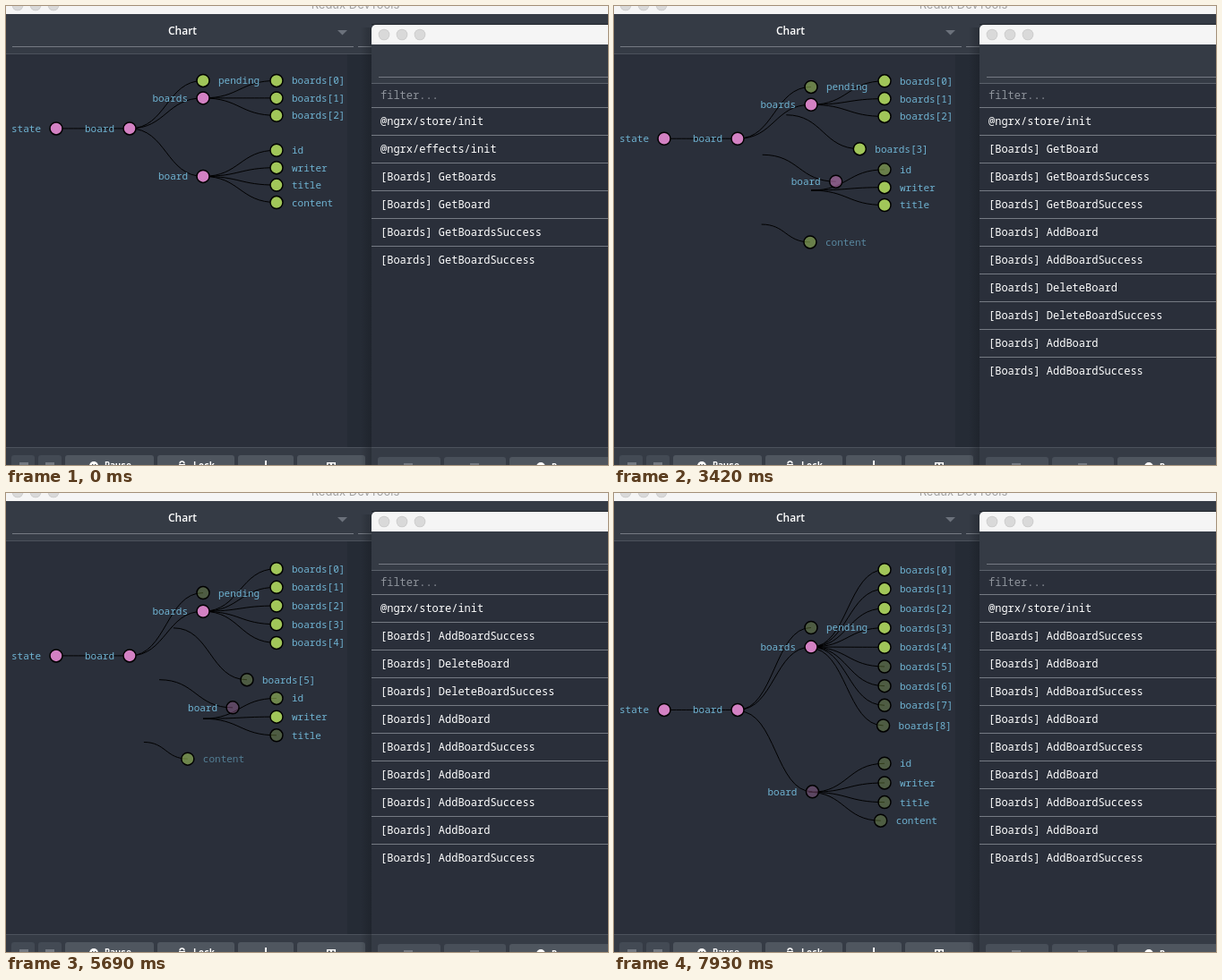
An HTML page with a canvas that plays this animation: 672 by 513 pixels, repeating every 7.99 s.

```html
<!DOCTYPE html>
<html lang="en">
<head>
<meta charset="utf-8">
<title>State chart</title>
<style>
  html, body { margin: 0; width: 100%; height: 100%; overflow: hidden; background: #2a2f3a; }
  canvas { display: block; }
</style>
</head>
<body>
<canvas id="stage" width="672" height="513"></canvas>
<script>
const ctx = document.getElementById('stage').getContext('2d');
const LOOP = 7990, MOVE = 750, BLINK = 100, LEAD = 50, DIM = 0.3;
const BG = '#2a2f3a', HEADER = '#353b45', LINE = '#757a83', BUTTON = '#4f565f';
const MONO = '"Noto Sans Mono", "DejaVu Sans Mono", monospace';
const SANS = '"Open Sans", Roboto, sans-serif';

// Each step changes the number of boards; gap is the delay between request and success.
const steps = [
  [210, 1], [1500, -1], [3050, 1], [4620, 1, 20], [5340, 1], [6005, 1], [6675, 1, 20], [7354, 1]
].map(([at, delta, gap = 0]) => ({ at, delta, gap, start: at - LEAD }));

const log = ['@ngrx/store/init', '@ngrx/effects/init', '[Boards] GetBoards', '[Boards] GetBoard',
  '[Boards] GetBoardsSuccess', '[Boards] GetBoardSuccess'].map(name => ({ at: 0, name }));
for (const { at, delta, gap } of steps) {
  const name = `[Boards] ${delta > 0 ? 'Add' : 'Delete'}Board`;
  log.push({ at: at - gap, name }, { at, name: name + 'Success' });
}

const mix = (a, b, p) => a + (b - a) * p;
const easeCubic = x => x < 0.5 ? 4 * x ** 3 : 1 - 4 * (1 - x) ** 3;

// Tidy tree for a given number of boards; nodes are listed depth first.
function layout(count) {
  const unit = 25 * (count + 4) / (count + 6);
  const mid = (count - 1) / 2, boardRow = count + 2.5, rootRow = (mid - 1 + boardRow) / 2;
  const nodes = [];
  const add = (label, depth, row, parent, isParent = false, flash = '') => {
    const x = 56 + 82 * depth, y = 64 + unit * (row + 1);
    const node = { label, x, y, sx: parent ? parent.x : x, sy: parent ? parent.y : y,
      isParent, flash, glow: 1, fade: 1 };
    nodes.push(node);
    return node;
  };
  const root = add('state', 0, rootRow, null, true);
  const store = add('board', 1, rootRow, root, true);
  add('pending', 2, mid - 1, store, false, 'add delete');
  const boards = add('boards', 2, mid, store, true);
  for (let i = 0; i < count; i++) add(`boards[${i}]`, 3, i, boards);
  const board = add('board', 2, boardRow, store, true, 'add');
  const flashes = ['add delete', 'delete', '', 'add'];
  ['id', 'writer', 'title', 'content'].forEach((label, i) =>
    add(label, 3, count + 1 + i, board, false, flashes[i]));
  return nodes;
}

const place = (a, b, p) => ({
  x: mix(a.x, b.x, p), y: mix(a.y, b.y, p),
  sx: mix(a.sx, b.sx, p), sy: mix(a.sy, b.sy, p)
});
const pointNode = (x, y) => ({ x, y, sx: x, sy: y, glow: 1, fade: 0 });

// Nodes are matched by index, so an inserted board shifts every later node.
function treeAt(time) {
  let count = 3, nodes = layout(count), leaving = [];
  steps.forEach((step, i) => {
    if (step.at > time) return;
    const next = steps[i + 1];
    const end = next && next.at <= time ? next.start : time;
    const elapsed = end - step.start;
    const p = easeCubic(Math.min(1, elapsed / MOVE));
    const before = nodes, kind = step.delta > 0 ? 'add' : 'delete';
    count += step.delta;
    const goal = layout(count);
    nodes = goal.map((to, k) => {
      const from = before[k] || pointNode(56, 303);
      let glow = from.glow;
      if (to.flash.includes(kind)) {
        glow = elapsed < MOVE ? mix(glow, DIM, p)
          : mix(DIM, 1, Math.min(1, (elapsed - MOVE) / BLINK));
      }
      return { ...to, ...place(from, to, p), glow, fade: mix(from.fade, 1, p) };
    });
    const exit = pointNode(goal[0].x, goal[0].y);
    leaving = p < 1 ? before.slice(goal.length).map(node =>
      ({ ...node, ...place(node, exit, p), fade: 1 - p, scale: 1 - p })) : [];
  });
  return [...nodes, ...leaving];
}

function rect(x, y, w, h, color) {
  ctx.fillStyle = color;
  ctx.fillRect(x, y, w, h);
}
function round(x, y, w, h, radii, color) {
  ctx.fillStyle = color;
  ctx.beginPath();
  ctx.roundRect(x, y, w, h, radii);
  ctx.fill();
}
function disc(x, y, r, color) {
  ctx.fillStyle = color;
  ctx.beginPath();
  ctx.arc(x, y, r, 0, 7);
  ctx.fill();
}
function text(str, x, y, color, font, align = 'left') {
  ctx.font = font;
  ctx.textAlign = align;
  ctx.fillStyle = color;
  ctx.fillText(str, x, y);
}
function lights(x, y) {
  for (let i = 0; i < 3; i++) {
    disc(x + 20 * i, y, 6.3, '#c9c9c9');
    disc(x + 20 * i, y, 5.6, '#d9d9d9');
  }
}
function buttons(y, spans) {
  for (const [x, w, color = BUTTON] of spans) round(x, y, w, 20, 3, color);
}
function pauseIcon(x, y) {
  disc(x, y, 5, '#fff');
  rect(x - 2, y - 2, 1.4, 5, BUTTON);
  rect(x + 1, y - 2, 1.4, 5, BUTTON);
}

function drawTree(time) {
  const nodes = treeAt(time);
  ctx.strokeStyle = '#000';
  ctx.lineWidth = 1;
  for (const { x, y, sx, sy } of nodes) {
    const mid = (sx + x) / 2;
    ctx.beginPath();
    ctx.moveTo(sx, sy);
    ctx.bezierCurveTo(mid, sy, mid, y, x, y);
    ctx.stroke();
  }
  ctx.lineWidth = 1.5;
  for (const { label, x, y, isParent, glow, fade, scale = 1 } of nodes) {
    ctx.globalAlpha = glow;
    disc(x, y, 7 * scale, isParent ? '#d381c3' : '#a1c659');
    ctx.globalAlpha = 1;
    if (scale === 1) ctx.stroke();
    ctx.globalAlpha = fade;
    text(label, x + (isParent ? -17 : 17), y + 4, '#6fb3d2', `11px ${MONO}`, isParent ? 'right' : 'left');
    ctx.globalAlpha = 1;
  }
}

function drawLeftWindow(time) {
  rect(0, 0, 672, 513, BG);
  rect(0, 0, 672, 9, '#f5f5f5');
  lights(13, -1);
  text('Redux DevTools', 390, 3, '#a2a2a2', '13px Inter, sans-serif', 'center');
  rect(0, 9, 672, 44, HEADER);
  rect(0, 53, 408, 1, '#4c525c');
  rect(7, 45, 381, 1, LINE);
  rect(393, 45, 15, 1, LINE);
  text('Chart', 197, 32, '#fff', `600 12px ${SANS}`, 'center');
  ctx.fillStyle = '#6b717b';
  ctx.beginPath();
  ctx.moveTo(370, 27);
  ctx.lineTo(381, 27);
  ctx.lineTo(375.5, 32.5);
  ctx.fill();

  rect(381, 54, 27, 439, 'rgba(30,36,44,.35)');
  drawTree(time);

  rect(0, 493, 408, 20, HEADER);
  rect(0, 493, 408, 1, '#4c525c');
  buttons(502, [[6, 26, '#434a54'], [36, 26, '#434a54'], [66, 99], [169, 86], [259, 62], [325, 76]]);
  const label = `600 10px ${MONO}`;
  pauseIcon(98, 514);
  text('Pause', 110, 517, '#fff', label);
  text('Lock', 209, 517, '#fff', label);
  ctx.strokeStyle = '#fff';
  ctx.lineWidth = 1.3;
  ctx.beginPath();
  ctx.arc(196.5, 511.5, 2.5, Math.PI, 0);
  ctx.stroke();
  rect(193, 512, 7, 2, '#fff');
  rect(289, 508, 2, 6, '#fff');
  rect(358, 510, 10, 1.5, '#fff');
  rect(358, 510, 1.5, 4, '#fff');
  rect(366.5, 510, 1.5, 4, '#fff');
  rect(362, 510, 2, 4, '#fff');
  rect(15, 510, 10, 3, '#737982');
  rect(44, 510, 10, 3, '#737982');
}

function drawRightWindow(time) {
  const shade = ctx.createLinearGradient(396, 0, 408, 0);
  shade.addColorStop(0, 'rgba(20,24,30,0)');
  shade.addColorStop(1, 'rgba(20,24,30,.35)');
  rect(396, 24, 12, 489, shade);
  rect(408, 20, 264, 1, '#1f242b');
  round(408, 21, 280, 40, [5, 0, 0, 0], '#f5f5f5');
  lights(422, 32);
  rect(408, 43, 264, 470, BG);
  rect(408, 43, 264, 43, HEADER);
  rect(416, 79, 256, 1, LINE);
  rect(408, 86, 264, 1, '#5b616b');
  text('filter...', 418, 104, '#8f949c', `12px ${MONO}`);

  const entries = log.filter(entry => entry.at <= time);
  const rows = [entries[0], ...entries.slice(1).slice(-9)];
  rows.forEach(({ name }, i) => {
    rect(408, 113 + 31 * i, 264, 1, LINE);
    text(name, 418, 133 + 31 * i, '#fff', `12px ${MONO}`);
  });

  rect(408, 493, 264, 20, HEADER);
  rect(408, 493, 264, 1, '#4c525c');
  buttons(504, [[415, 70, '#484f59'], [489, 69, '#484f59'], [562, 120]]);
  rect(444, 511, 10, 2, '#737982');
  rect(518, 511, 10, 2, '#737982');
  pauseIcon(597, 515);
  text('Pause', 609, 519, '#fff', `600 10px ${MONO}`);
}

function frame() {
  const time = performance.now() % LOOP;
  drawLeftWindow(time);
  drawRightWindow(time);
  requestAnimationFrame(frame);
}
frame();
</script>
</body>
</html>
```
